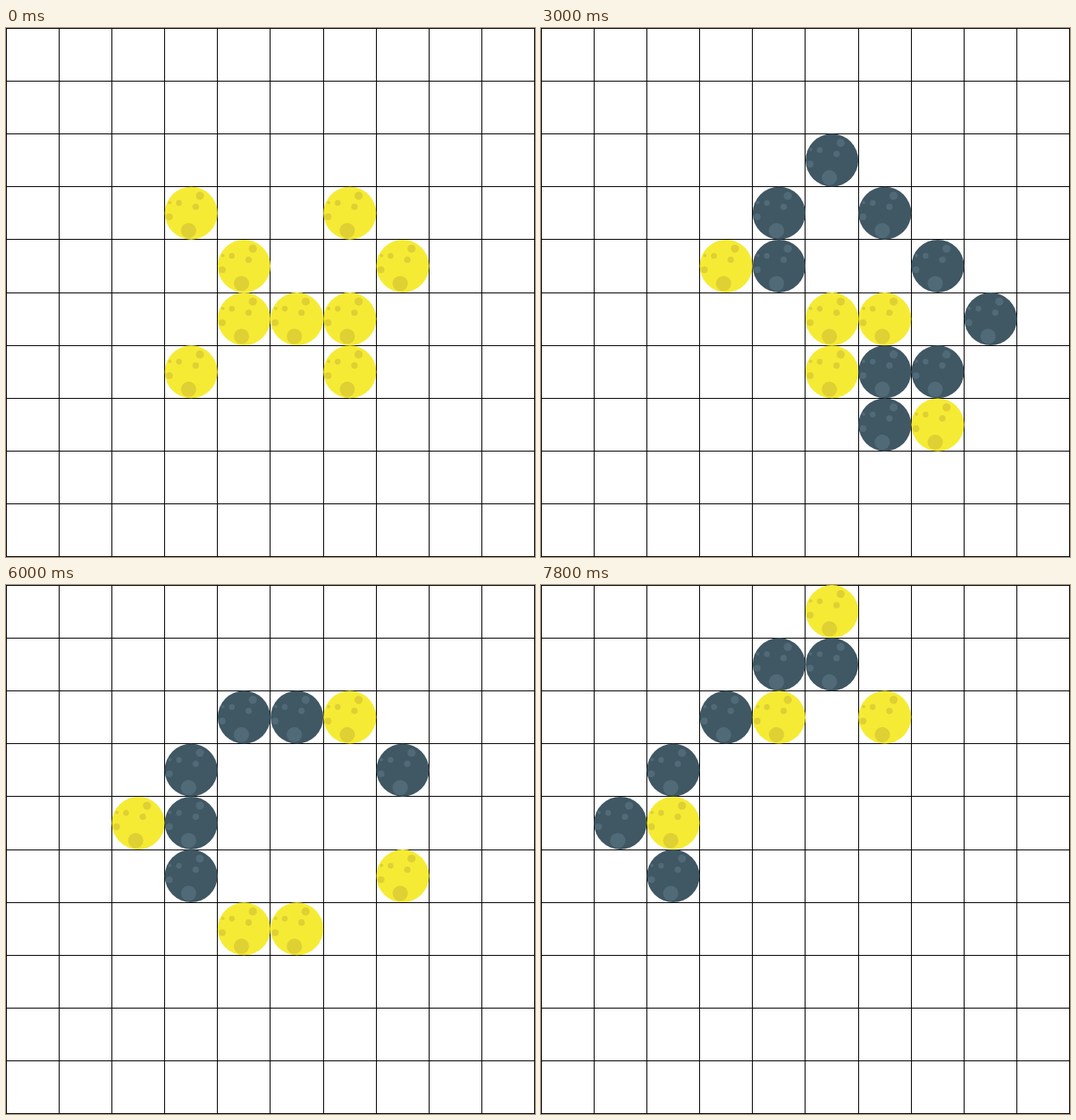
Write an HTML page with a canvas that moves like this. It is 622x622 px and loops after 8 s.

```html
<!DOCTYPE html>
<html lang="en">
<head>
<meta charset="utf-8">
<title>Game of Life</title>
<style>
  html, body { margin: 0; width: 100%; height: 100%; overflow: hidden; background: #fff; }
  canvas { display: block; }
</style>
</head>
<body>
<canvas id="stage" width="622" height="622"></canvas>
<script>
const SIZE = 622, N = 10, CELL = SIZE / N;
const STEP = 600, LOOP = 8000;
const NEWBORN = { disc: '#f6eb34', crater: '#dfd034' };
const SURVIVOR = { disc: '#405764', crater: '#516a78' };

// Crater offsets from the disc centre, and radius
const CRATERS = [
  [-3, 20.5, 9], [10.3, -20.4, 4.8], [5.4, -7.4, 3.8],
  [-14.3, -12, 3.4], [-25.6, 4.4, 4], [-25, -12.4, 2]
];

const START = [
  '..........',
  '..........',
  '..........',
  '...#..#...',
  '....#..#..',
  '....###...',
  '...#..#...',
  '..........',
  '..........',
  '..........'
];

const ctx = document.getElementById('stage').getContext('2d');

// Cell values: 0 empty, 1 newborn, 2 survivor
function evolve(grid) {
  const alive = (x, y) => (grid[y] && grid[y][x] ? 1 : 0);
  return grid.map((row, y) => row.map((cell, x) => {
    let near = -alive(x, y);
    for (let dy = -1; dy <= 1; dy++) {
      for (let dx = -1; dx <= 1; dx++) near += alive(x + dx, y + dy);
    }
    if (cell) return near === 2 || near === 3 ? 2 : 0;
    return near === 3 ? 1 : 0;
  }));
}

const generations = [START.map(row => [...row].map(c => (c === '#' ? 1 : 0)))];
while (generations.length * STEP < LOOP) {
  generations.push(evolve(generations[generations.length - 1]));
}

function dot(x, y, r, color) {
  ctx.fillStyle = color;
  ctx.beginPath();
  ctx.arc(x, y, r, 0, Math.PI * 2);
  ctx.fill();
}

function drawMoon(col, row, colors) {
  const x = (col + 0.5) * CELL, y = (row + 0.5) * CELL;
  dot(x, y, 31, colors.disc);
  for (const [dx, dy, r] of CRATERS) dot(x + dx, y + dy, r, colors.crater);
}

function drawGrid() {
  ctx.fillStyle = '#000';
  for (let i = 0; i <= N; i++) {
    ctx.fillRect(Math.floor(i * 62.19), 0, 1, SIZE);
    ctx.fillRect(0, Math.min(Math.floor(i * CELL), SIZE - 1), SIZE, 1);
  }
}

function draw(grid) {
  ctx.fillStyle = '#fff';
  ctx.fillRect(0, 0, SIZE, SIZE);
  drawGrid();
  grid.forEach((row, y) => row.forEach((cell, x) => {
    if (cell) drawMoon(x, y, cell === 1 ? NEWBORN : SURVIVOR);
  }));
}

const begin = performance.now();
let shown = -1;

function tick() {
  const index = Math.floor(((performance.now() - begin) % LOOP) / STEP);
  if (index !== shown) draw(generations[shown = index]);
  requestAnimationFrame(tick);
}
tick();
</script>
</body>
</html>
```
